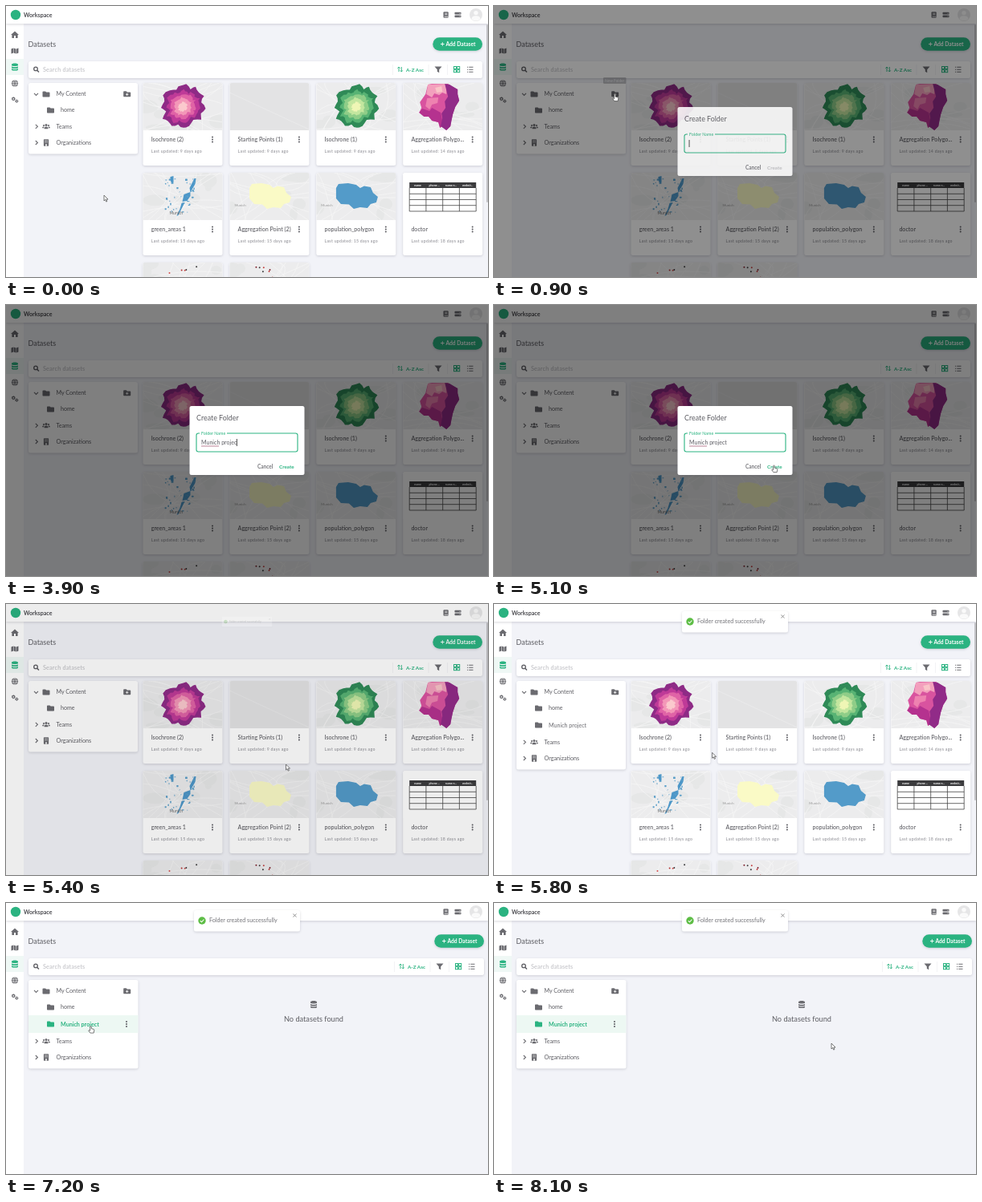
Write an HTML page that moves like this. It is 600 px wide and 338 px high and loops after 8200 ms.

```html
<!DOCTYPE html>
<html lang="en">
<head>
<meta charset="utf-8">
<title>Create folder</title>
<style>
html, body { margin: 0; width: 100%; height: 100%; overflow: hidden; background: #f2f3f8; }
svg { display: block; width: 100vw; height: 100vh; }
text { font-family: Lato, "Open Sans", sans-serif; white-space: pre; }
.card { filter: drop-shadow(0 1px 1.5px rgba(60, 60, 80, .2)); }
</style>
</head>
<body>
<svg id="stage" viewBox="0 0 600 338" xmlns="http://www.w3.org/2000/svg"></svg>
<script>
const LOOP = 8200, STEP = 100;
const GREEN = '#2bb381', INK = '#6b6b70', TEXT = '#5d5d63';
const stage = document.getElementById('stage');

// Drawing helpers
const rect = (x, y, w, h, fill, r = 0, more = '') =>
  `<rect x="${x}" y="${y}" width="${w}" height="${h}" rx="${r}" fill="${fill}" ${more}/>`;
const circle = (x, y, r, fill, more = '') => `<circle cx="${x}" cy="${y}" r="${r}" fill="${fill}" ${more}/>`;
const path = (d, fill, more = '') => `<path d="${d}" fill="${fill}" ${more}/>`;
const line = (d, stroke, w = 1, more = '') => path(d, 'none', `stroke="${stroke}" stroke-width="${w}" ${more}`);
const label = (x, y, s, size, fill = TEXT, weight = 400, gap = 0, more = '') =>
  `<text x="${x}" y="${y}" font-size="${size}" fill="${fill}" font-weight="${weight}" letter-spacing="${gap}" ${more}>${s}</text>`;
const group = (s, more = '') => `<g ${more}>${s}</g>`;
const at = (x, y, s, more = '') => group(s, `transform="translate(${x} ${y})" ${more}`);
const poly = (points, fill) => `<polygon points="${points}" fill="${fill}"/>`;

function random(seed) {
  return () => (seed = (seed * 16807) % 2147483647) / 2147483647;
}

// Icons are centred on 0,0
const dots = [-3, 0, 3].map(y => circle(0, y, 1, TEXT)).join('');
const home = path('M-5 0L0-4.5 5 0H3.6V4H1V1H-1V4H-3.6V0Z', INK);
const mapIcon = path('M-4.5-2.5L-1.8-3.5V2.5L-4.5 3.5ZM-1.3-3.5L1.3-2.5V3.5L-1.3 2.5ZM1.8-2.5L4.5-3.5V2.5L1.8 3.5Z', INK);
const database = fill => path('M-4-3C-4-5 4-5 4-3V-2C4-.6-4-.6-4-2ZM-4-.8C-3 .5 3 .5 4-.8V1C4 2.3-4 2.3-4 1ZM-4 2.1C-3 3.4 3 3.4 4 2.1V3.4C4 5-4 5-4 3.4Z', fill);
const globe = circle(0, 0, 4.1, INK) +
  line('M-4-1.3H4M-4 1.4H4M0-4C-2.6-1.5-2.6 1.5 0 4C2.6 1.5 2.6-1.5 0-4', '#fff', .6);
const cog = (x, y, r) => circle(x, y, r, INK, 'stroke="' + INK + '" stroke-width="1" stroke-dasharray=".9 .7"') + circle(x, y, r * .42, '#fff');
const folder = fill => path('M-4.5-2.7Q-4.5-3.5-3.7-3.5H-1L.2-2.4H3.7Q4.5-2.4 4.5-1.6V2.7Q4.5 3.5 3.7 3.5H-3.7Q-4.5 3.5-4.5 2.7Z', fill);
const addFolder = folder(INK) + line('M-1.6.5H1.6M0-1.1V2.1', '#fff', .9);
const people = [[-3, -1.3, 1.1], [3, -1.3, 1.1], [0, -1.7, 1.5]].map(([x, y, r]) => circle(x, y, r, INK)).join('') +
  path('M-4.8 2V1Q-4.5.2-2.6.3L-2.8 2ZM4.8 2V1Q4.5.2 2.6.3L2.8 2ZM-2.4 3V2Q-2.2.3 0 .3T2.4 2V3Z', INK);
const building = rect(-3.1, -4.2, 6.2, 8.4, INK, .6) +
  line('M-1.6-2.5H-.4M.5-2.5H1.7M-1.6-.6H-.4M.5-.6H1.7', '#fff', .9) + rect(-.8, 1.8, 1.6, 2.4, '#fff');
const right = line('M-1.2-2.5L1.4 0-1.2 2.5', INK, 1.1);
const down = line('M-2.5-1.2L0 1.4 2.5-1.2', INK, 1.1);

// Map thumbnails, 99 x 59
function mapBase(seed) {
  const rnd = random(seed * 7919);
  let s = rect(0, 0, 99, 59, '#ececed');
  for (let i = 0; i < 6; i++) {
    s += `<ellipse cx="${rnd() * 99}" cy="${rnd() * 59}" rx="${4 + rnd() * 12}" ry="${3 + rnd() * 7}" fill="#e6e7e7"/>`;
  }
  for (let i = 0; i < 11; i++) {
    const a = rnd() * 59, b = rnd() * 59, x = rnd() * 99;
    s += line(i % 2 ? `M0 ${a}Q${x} ${b} 99 ${rnd() * 59}` : `M${x} 0Q${rnd() * 99} ${a} ${rnd() * 99} 59`, '#f6f6f6', .7);
  }
  return s;
}

// Outline around 0,0, shrunk and roughened for every ring
const reach = [[-17, -22], [-8, -22], [-3, -28], [4, -27], [10, -23], [16, -25], [20, -18], [25, -13], [24, -6], [28, 2], [23, 8],
  [22, 15], [14, 17], [8, 24], [1, 27], [-6, 23], [-14, 24], [-18, 17], [-24, 14], [-22, 6], [-27, 1], [-23, -7], [-24, -14]];

function ring(size, rough, seed) {
  const rnd = random(seed), wobble = () => (rnd() - .5) * rough;
  return reach.map(([x, y], i) => {
    const [u, v] = reach[(i + 1) % reach.length], k = size * (1 + wobble() * .08);
    const mx = (x + u) / 2 * size + wobble(), my = (y + v) / 2 * size + wobble();
    return `${(x * k).toFixed(1)},${(y * k).toFixed(1)} ${mx.toFixed(1)},${my.toFixed(1)}`;
  }).join(' ');
}

const rings = (seed, colors) => at(49.5, 30, colors.map((c, i) =>
  poly(ring([1, .78, .6, .41, .22][i], i ? 2.6 : 1.6, seed + i * 977), c)).join(''));
const town = (x, y) => label(x, y, 'Munich', 4.3, '#999');
const city = fill => poly('24.6,19 27.6,14 39.6,13 49.6,15 54.6,19 59.6,16.5 67.6,18 70.6,25 76.6,30 74.6,37 67.6,39 63.6,44 54.6,43 46.6,45 40.6,39.5 30.6,39 24.6,32', fill);

function parks() {
  const rnd = random(5501), blue = '#4d97c8';
  let s = poly('64,7 66,7 65,14 61,21 59,24 58,19', blue) + poly('51,27 59,24 59,29 55,35 49,36', blue) +
    poly('48,38 52,37 49,43 44,53 42,54 46,45', blue) + poly('34,5 38,4 38,12 36,14 34,9', blue);
  for (let i = 0; i < 42; i++) {
    s += rect(27 + rnd() * 36, 7 + rnd() * 44, .7 + rnd() * 2.2, .7 + rnd() * 1.8, '#5b9fc9', .4);
  }
  return s + label(33, 52, 'Munich', 5, '#666');
}

function table() {
  let s = rect(0, 0, 99, 59, '#fff') + rect(8, 12, 83, 7, '#3b3b3d');
  s += line('M8 19V48H91V19M8 26.3H91M8 33.5H91M8 40.7H91M28.7 19V48M49.5 19V48M70.2 19V48', '#444', .8);
  ['name', 'phone ...', 'name n...', 'websit...'].forEach((h, i) =>
    s += label(18.4 + i * 20.7, 16.8, h, 3.6, '#fff', 700, 0, 'text-anchor="middle"'));
  return s;
}

const aggregate = poly('31,2 36,1 56,1 60,4 68,8 68,14 70,22 65,30 62,39 60,47 59,54 54,59 49,54 46,56 44,49 36,47 32,42 26,42 26,38 20,37 23,31 21,24 28,14', '#d9539f') +
  poly('31,2 54,1 54,14 49,12 45,15 39,13 36,18 29,14', '#f3a0bd') + poly('40,6 48,4 49,11 42,12', '#f9c4c8') +
  poly('30,19 44,18 43,25 36,27 33,33 28,29', '#ee82b0') +
  poly('20,37 24,32 33,35 36,31 47,37 50,52 46,56 44,49 36,47 32,42 26,42', '#b5328f') +
  poly('52,1 58,2 68,8 68,14 70,22 65,30 62,39 59,54 54,59 47,54 49,44 48,38 53,31 52,23 56,17', '#912b88');

function pins(seed, colors) {
  const rnd = random(seed);
  let s = mapBase(seed);
  for (let i = 0; i < 14; i++) s += circle(33 + rnd() * 37, 5 + rnd() * 34, 1, colors[i % 3]);
  return s;
}

const cards = [
  ['Isochrone (2)', 9, mapBase(3) + rings(4211, ['#8e2b86', '#bf3a98', '#e063a6', '#f397b8', '#fbc9cd'])],
  ['Starting Points (1)', 9, rect(0, 0, 99, 59, '#e3e3e4') + line('M0 12L99 58', '#eaeaeb', 1)],
  ['Isochrone (1)', 9, mapBase(5) + rings(4211, ['#2f8a57', '#58b374', '#8fcd88', '#c3e69f', '#eff6b5'])],
  ['Aggregation Polygo...', 14, mapBase(8) + aggregate],
  ['green_areas 1', 15, mapBase(11) + parks()],
  ['Aggregation Point (2)', 15, mapBase(14) + town(6, 42) + city('#fafac6')],
  ['population_polygon', 15, mapBase(14) + town(6, 42) + city('#539bc9')],
  ['doctor', 18, table()],
  ['', 0, pins(17, ['#d34b4b', '#3d3d3d', '#b33636'])],
  ['', 0, pins(23, ['#7c1f2b', '#3d3d3d', '#c23d3d'])]
];

function card([name, days, art], i) {
  const x = 170.5 + (i % 4) * 107.9, y = 96 + Math.floor(i / 4) * 112;
  let s = rect(0, 0, 99, 103, '#fff', 2.5, 'class="card"') + group(art, 'clip-path="url(#thumb)"');
  if (name) {
    s += label(10.2, 73, name, 7.1, TEXT, 500) + at(86.5, 70.5, dots);
    s += label(10.2, 87.2, `Last updated: ${days} days ago`, 5.2, '#9a9aa0', 600, .28);
  }
  return at(x, y, s);
}

const header = rect(0, 0, 600, 22, '#fff', 0, 'class="card"') + circle(12, 11, 6.2, GREEN) +
  label(22, 13.7, 'Workspace', 7.1, '#4b4b50', 700) +
  at(547.5, 11, rect(-3, -3.8, 6.2, 7.6, INK, 1) + line('M-1.2-1.8H1.8M-1.2-.3H1.8M-1.8 2.3H3', '#fff', .7)) +
  at(562.5, 11, rect(-4, -3.2, 8, 2.8, INK, .7) + rect(-4, .4, 8, 2.8, INK, .7) + circle(2.5, -1.8, .5, '#fff') + circle(2.5, 1.8, .5, '#fff')) +
  circle(585, 11, 8, '#e6e6e7') + circle(585, 8.6, 2.7, '#fafafa') + path('M579.5 16.5Q579.5 12.2 585 12.2T590.5 16.5Q585 20.5 579.5 16.5Z', '#fafafa');

const sidebar = rect(0, 22, 22, 316, '#fff') + rect(0, 66, 22, 20, '#eff8f5') + at(11, 36, home) + at(11, 56, mapIcon) +
  at(11, 76, database(GREEN)) + at(11, 96.5, globe) + at(11, 117, cog(-1.7, -1.2, 2) + cog(2.3, 1.7, 1.6));

const toolbar =
  rect(531.3, 39.3, 61.7, 16.4, GREEN, 8.2, 'class="card"') + line('M541 47.5H545.6M543.3 45.2V49.8', '#fff', .9) +
  label(547.5, 50, 'Add Dataset', 6.7, '#fff', 700) +
  line('M489 82V76M487.4 77.6L489 76 490.6 77.6M492.3 76V82M490.8 80.4L492.3 82 493.8 80.4', GREEN, .9) +
  label(498, 81.5, 'A-Z Asc', 6.3, GREEN, 700) +
  line('M481.5 73V86M526 73V86M549.5 73V86', '#f0f0f3', .8) +
  path('M533.5 75.5H542.5L539.2 79.3V83.2L536.8 81.8V79.3Z', INK) +
  [[557.5, 75.5], [561.7, 75.5], [557.5, 79.7], [561.7, 79.7]].map(([x, y]) =>
    rect(x, y, 3, 3, 'none', 0, `stroke="${GREEN}" stroke-width="1"`)).join('') +
  line('M574 76.2H575.2M576.3 76.2H581.5M574 79.2H575.2M576.3 79.2H581.5M574 82.2H575.2M576.3 82.2H581.5', INK, 1.1);

const tree = rect(28, 96, 136, 88.5, '#fff', 2.5, 'class="card" id="panel"') +
  at(37.5, 110, down) + at(50, 110, folder(INK)) + label(62.5, 112.4, 'My Content', 7.1) +
  at(150.7, 109.8, addFolder) + at(55.5, 130, folder(INK)) + label(68, 132.4, 'home', 7.1) +
  group(rect(28, 140, 136, 22, '#f4f4f5', 0, 'id="row"') + at(55.5, 151, folder('currentColor')) +
    label(68, 153.6, 'Munich project', 7.1, 'currentColor', 400, 0, 'id="rowName"') + at(150, 151, dots, 'id="rowMenu"'), 'id="newRow"') +
  group(at(38, 150.3, right) + at(50, 150.3, people) + label(62.5, 152.8, 'Teams', 7.1) +
    at(38, 170.5, right) + at(50, 170.5, building) + label(62.5, 173.2, 'Organizations', 7.2), 'id="lower"');

const dialog = rect(228.5, 126, 143, 86, '#fff', 2.5, 'class="card"') + label(237, 144, 'Create Folder', 8.9) +
  rect(237, 160, 126, 23, '#fff', 2.5, `stroke="${GREEN}" stroke-width="1.1"`) + rect(241, 158, 34, 4, '#fff') +
  label(243, 162.2, 'Folder Name', 5.4, GREEN) +
  label(243, 174.2, '', 7.05, TEXT, 400, 0, 'id="typed"') +
  line('M243 176H265', '#a0506a', .7, 'id="spell"') + rect(242.6, 167, .9, 9, '#333', 0, 'id="caret"') +
  label(313, 204.2, 'Cancel', 6.5, '#77777c', 700) + label(340, 204.2, 'Create', 6.3, '#c4c4c7', 700, 0, 'id="create"');

const toast = rect(234, 9, 132, 26.5, '#fff', 2.5, 'class="card"') + circle(244, 22, 4.7, '#5dbd45') +
  line('M241.8 22.1L243.5 23.8 246.4 20.5', '#fff', 1.1) + label(253, 24.4, 'Folder created successfully', 7.2, '#717176') +
  line('M357.5 13.5L361.5 17.5M361.5 13.5L357.5 17.5', '#777', .8);

const edge = 'stroke="#444" stroke-width=".7" stroke-linejoin="round"';
const pointers = group(path('M0 0V7L1.6 5.5 2.7 8.1 3.9 7.6 2.8 5.1H5Z', '#fff', edge), 'id="arrow"') +
  group(path('M-.8.5Q0-.5.8.5V3.2L3.5 3.9Q4.5 4.2 4.3 5.2L3.7 8.6H-.7L-2.8 5.6Q-2.7 4.5-.8 5.7Z', '#fff', edge), 'id="hand"') +
  group(line('M-1.3-4H1.3M0-4V4M-1.3 4H1.3', '#bbb', .6), 'id="beam"');

stage.innerHTML =
  `<defs><clipPath id="thumb"><path d="M0 59V2.5Q0 0 2.5 0H96.5Q99 0 99 2.5V59Z"/></clipPath></defs>` +
  rect(0, 0, 600, 338, '#f2f3f8') + group(cards.map(card).join(''), 'id="grid"') +
  label(27.5, 50.7, 'Datasets', 9) + rect(28, 69, 565, 21, '#fff', 2.5, 'class="card" id="bar"') +
  circle(37, 78.4, 2.3, 'none', `stroke="${TEXT}" stroke-width="1.3"`) + line('M38.7 80.2L41 82.5', TEXT, 1.5) +
  label(46, 81.7, 'Search datasets', 7.3, '#bcbcc1', 400, .15) + group(toolbar, 'id="tools"') + tree +
  group(at(383, 126.5, database(INK) + line('M-4-.9Q0 1 4-.9', '#f2f3f8', .5)) +
    label(383, 148.2, 'No datasets found', 9.2, TEXT, 400, 0, 'text-anchor="middle"'), 'id="empty"') +
  sidebar + header + rect(598, 23, 2, 222, '#c3c3c7', 1, 'id="scroll"') +
  group(rect(136, 89, 28.5, 8, '#66666a', 1.2) + label(150.2, 94.7, 'New Folder', 4.8, '#fff', 400, 0, 'text-anchor="middle"'), 'id="tip"') +
  rect(0, 0, 600, 338, '#000', 0, 'id="shade"') + group(dialog, 'id="dialog"') + group(toast, 'id="toast"') + group(pointers, 'id="pointer"');

const el = {};
stage.querySelectorAll('[id]').forEach(n => el[n.id] = n);

// Timeline
const NAME = 'Munich project';
const route = [[0, 122, 236], [100, 122, 236], [600, 150.5, 110], [1000, 150.5, 110], [1500, 290, 167], [4200, 290, 167],
  [4800, 348.5, 200], [5500, 348.5, 200], [6300, 105.5, 153.5], [7200, 105.5, 153.5], [7900, 420, 175], [LOOP, 420, 175]];
const ramp = (t, a, b) => Math.min(1, Math.max(0, (t - a) / (b - a)));
const ease = p => p * p * (3 - 2 * p);
const between = (t, a, b) => t >= a && t < b;
const set = (n, attrs) => { for (const k in attrs) n.setAttribute(k, attrs[k]); };
const show = (n, on) => { n.style.display = on ? '' : 'none'; };

function pointerAt(t) {
  const i = route.findIndex((p, k) => t >= p[0] && t < route[k + 1][0]);
  const [t0, x0, y0] = route[i], [t1, x1, y1] = route[i + 1], p = ease(ramp(t, t0, t1));
  return [x0 + (x1 - x0) * p, y0 + (y1 - y0) * p];
}

function draw(t) {
  const created = t >= 5700, picked = t >= 6900, empty = t >= 7000;

  show(el.grid, !empty);
  show(el.scroll, !empty);
  show(el.empty, t >= 7200);
  set(el.tools, { transform: `translate(${empty ? 2 : 0} 0)` });
  set(el.bar, { width: empty ? 567 : 565 });
  set(el.panel, { height: created ? 110.5 : 88.5, width: empty ? 136.5 : 136 });
  set(el.lower, { transform: `translate(0 ${created ? 22 : 0})` });

  const hover = between(t, 6200, 7400);
  show(el.newRow, created);
  el.newRow.style.color = picked ? GREEN : INK;
  set(el.row, { fill: picked ? '#edf8f3' : hover ? '#f4f4f5' : '#fff', width: empty ? 136.5 : 136 });
  set(el.rowName, { 'font-weight': picked ? 700 : 400 });
  show(el.rowMenu, hover || picked);

  set(el.tip, { opacity: ramp(t, 500, 700) * (1 - ramp(t, 750, 980)) });
  const open = ramp(t, 680, 930);
  set(el.shade, { opacity: open * .5 * (1 - ramp(t, 5100, 5450)) });
  set(el.dialog, { opacity: open * (1 - ramp(t, 5100, 5350)) });

  const count = t < 2000 ? 0 : Math.min(NAME.length, 1 + Math.floor((t - 2000) / 153));
  el.typed.textContent = NAME.slice(0, count);
  set(el.caret, { x: 242.6 + (count ? el.typed.getComputedTextLength() : 0) });
  show(el.caret, between(t, 1900, 4100) || Math.floor((t - 500) / 500) % 2 === 0);
  show(el.spell, count > 6);
  set(el.create, { fill: count ? GREEN : '#c4c4c7' });

  const pop = ramp(t, 5300, 5700), size = .3 + .7 * pop;
  set(el.toast, { opacity: pop, transform: `translate(300 22) scale(${size}) translate(-300 -22)` });

  const [x, y] = pointerAt(t);
  const hand = between(t, 550, 1050) || between(t, 4700, 5200) || between(t, 6100, 7350);
  const beam = between(t, 1400, 4400);
  set(el.pointer, { transform: `translate(${x} ${y})` });
  show(el.hand, hand);
  show(el.beam, beam && !between(t, 2000, 4200));
  show(el.arrow, !hand && !beam);
}

const start = performance.now();
function tick() {
  const t = (performance.now() - start) % LOOP;
  draw(Math.floor(t / STEP) * STEP);
  requestAnimationFrame(tick);
}
tick();
</script>
</body>
</html>
```
